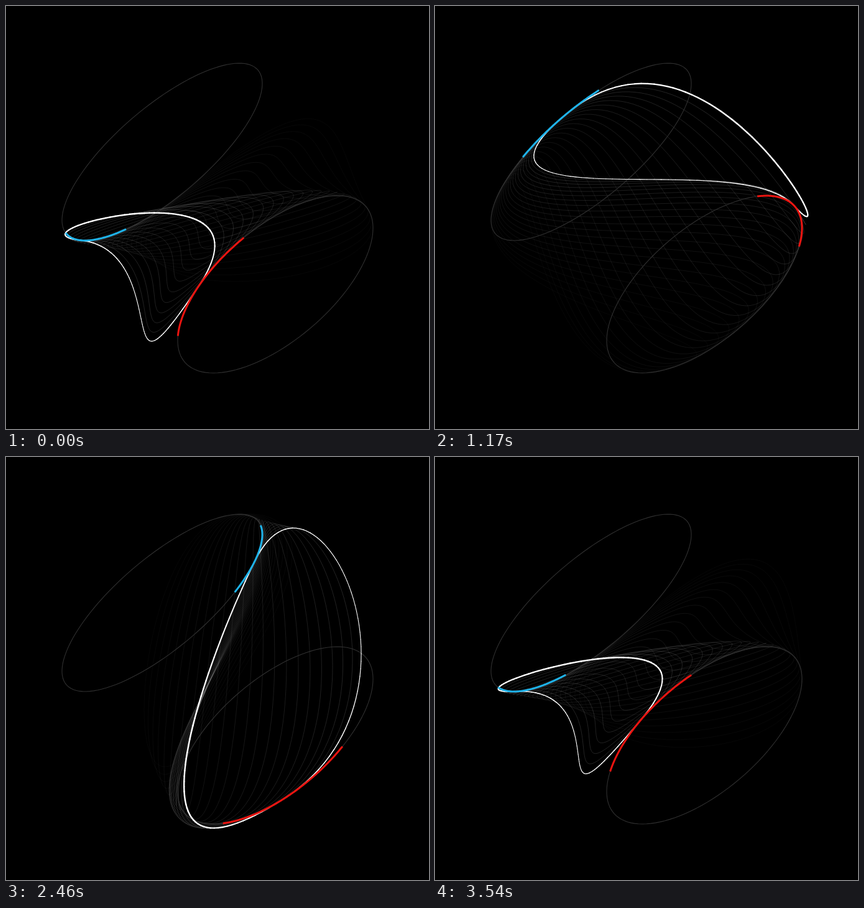
An HTML page with a canvas that plays this animation: 680 px wide and 680 px high, repeating every 3.57 s.

```html
<!DOCTYPE html>
<html lang="en">
<head>
<meta charset="utf-8">
<title>Loop between two rings</title>
<style>
  html, body { margin: 0; height: 100%; overflow: hidden; background: #000; }
  canvas { display: block; width: 680px; height: 680px; }
</style>
</head>
<body>
<canvas id="stage" width="680" height="680"></canvas>
<script>
const ctx = document.getElementById('stage').getContext('2d');
const LOOP = 3570, TURN = 3600, STEP = 30, TRAILS = 22, HANDLE = 1.54, SEGMENTS = 120;
const { PI, sin, cos, sqrt } = Math;
const rad = degrees => degrees * PI / 180;

// Circles seen in perspective: 'near' is the angle closest to the viewer, 'depth' the distance.
const blue = { x: 251, y: 234.5, rx: 161, ry: 142.5, skew: rad(140.4), near: rad(70), e: 0.083, depth: 1,
  start: rad(133.7), turns: 1, half: rad(25.75), lead: rad(6), color: '#1eb4ec' };
const red = { x: 433, y: 447.5, rx: 157, ry: 142.5, skew: rad(-129.4), near: rad(291), e: 0.07, depth: 1.05,
  start: rad(144.1), turns: 2, half: rad(35.6), lead: 0, color: '#ec1410' };

// Homogeneous coordinates [x*w, y*w, w], so that mixing them keeps the perspective.
function homogeneous(ring, u, v, w) {
  const { near, skew, depth } = ring;
  const c = u * cos(near) - v * sin(near), s = u * sin(near) + v * cos(near);
  return [
    w * ring.x + ring.rx * c,
    w * ring.y + ring.ry * (c * cos(skew) + s * sin(skew)),
    w
  ].map(n => n * depth);
}

function pointOn(ring, angle) {
  const c = cos(angle - ring.near), s = sin(angle - ring.near), e = ring.e;
  return homogeneous(ring, c - e, sqrt(1 - e * e) * s, 1 - e * c);
}

function tangentOn(ring, angle) {
  const c = cos(angle - ring.near), s = sin(angle - ring.near), e = ring.e;
  return homogeneous(ring, -s, sqrt(1 - e * e) * c, e * s);
}

const project = ([x, y, w]) => [x / w, y / w];
const offset = (p, d, k) => p.map((n, i) => n + k * d[i]);
const angleAt = (ring, t) => ring.start + ring.turns * 2 * PI * t / TURN;

function bezier(a, b, c, d, u) {
  const v = 1 - u;
  return project(a.map((n, i) =>
    v * v * v * n + 3 * v * v * u * b[i] + 3 * v * u * u * c[i] + u * u * u * d[i]));
}

// Closed curve of two cubic arcs that touches both rings along their motion.
function loopPoints(t) {
  const [from, to] = [blue, red].map(ring => {
    const angle = angleAt(ring, t) + ring.lead;
    const p = pointOn(ring, angle), d = tangentOn(ring, angle);
    return { p, out: offset(p, d, HANDLE), back: offset(p, d, -HANDLE) };
  });
  return Array.from({ length: SEGMENTS + 1 }, (_, i) => {
    const s = 2 * i / SEGMENTS;
    return s < 1 ? bezier(from.p, from.out, to.back, to.p, s)
                 : bezier(to.p, to.out, from.back, from.p, s - 1);
  });
}

function stroke(points, color, width) {
  ctx.beginPath();
  points.forEach(p => ctx.lineTo(...p));
  ctx.strokeStyle = color;
  ctx.lineWidth = width;
  ctx.stroke();
}

function strokeArc(ring, from, to, color, width) {
  const points = Array.from({ length: 121 }, (_, i) =>
    project(pointOn(ring, from + (to - from) * i / 120)));
  stroke(points, color, width);
}

function draw(t) {
  ctx.fillStyle = '#000';
  ctx.fillRect(0, 0, 680, 680);
  ctx.lineJoin = 'round';
  ctx.lineCap = 'butt';

  for (let k = TRAILS; k > 0; k--) {
    const alpha = 0.16 * (1 - k / (TRAILS + 5));
    stroke(loopPoints(t - k * STEP), `rgba(255,255,255,${alpha})`, 0.9);
  }
  for (const ring of [blue, red]) strokeArc(ring, 0, 2 * PI, '#303030', 1.1);

  ctx.lineCap = 'round';
  const points = loopPoints(t);
  for (let i = 0; i < SEGMENTS; i++) {
    stroke([points[i], points[i + 1]], '#fff', 1.75 + 0.7 * sin(2 * PI * i / SEGMENTS));
  }

  ctx.lineCap = 'butt';
  for (const ring of [blue, red]) {
    const angle = angleAt(ring, t);
    strokeArc(ring, angle - ring.half, angle + ring.half, ring.color, 3);
  }
}

function tick() {
  draw(performance.now() % LOOP);
  requestAnimationFrame(tick);
}
tick();
</script>
</body>
</html>
```
